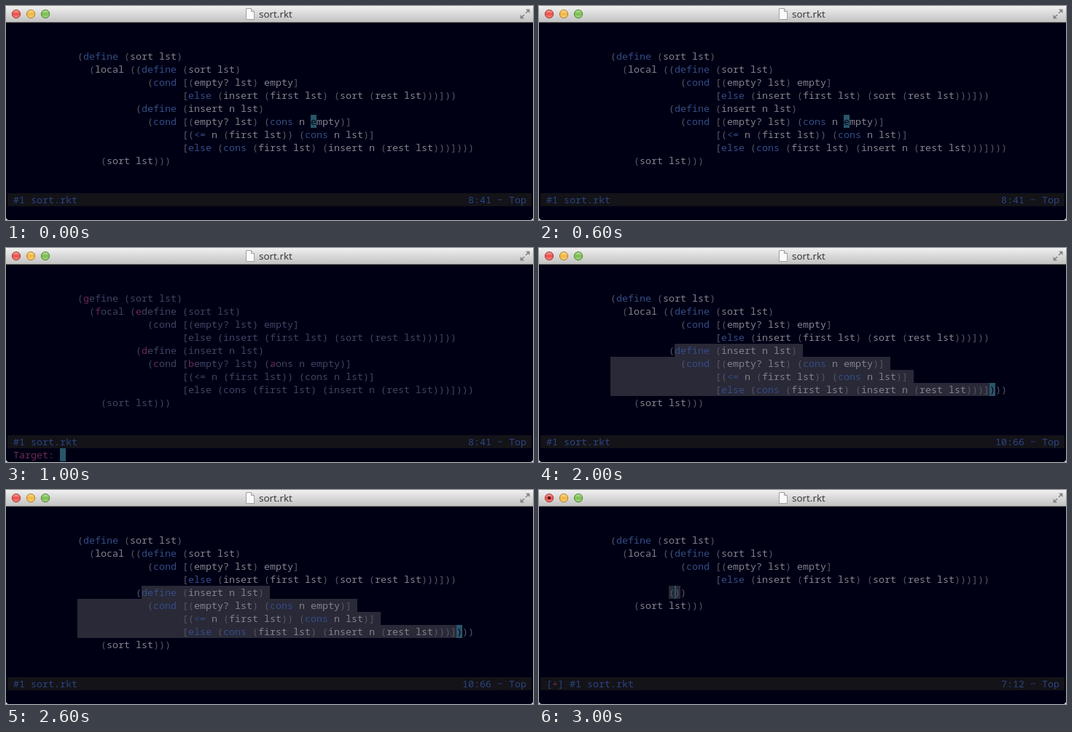
These frames come from a looping animation (723x295 px, 4000 ms). An HTML page:

```html
<!DOCTYPE html>
<html lang="en">
<head>
<meta charset="utf-8">
<title>sort.rkt</title>
<style>
html, body { margin: 0; width: 100%; height: 100%; overflow: hidden; background: #fff; }
svg { display: block; }
text { white-space: pre; }
.code { font: 13.3333px "Noto Sans Mono", "DejaVu Sans Mono", monospace; }
.title { font: 13.5px "Open Sans", "Lato", sans-serif; fill: #303030; }
</style>
</head>
<body>
<svg width="723" height="295" viewBox="0 0 723 295">
  <defs>
    <linearGradient id="bar" x2="0" y2="1">
      <stop offset="0" stop-color="#f0f0f0"/>
      <stop offset="1" stop-color="#c2c2c2"/>
    </linearGradient>
    <linearGradient id="gloss" x2="0" y2="1">
      <stop offset="0" stop-color="#fff" stop-opacity=".5"/>
      <stop offset=".5" stop-color="#fff" stop-opacity="0"/>
      <stop offset="1" stop-color="#fff" stop-opacity=".35"/>
    </linearGradient>
  </defs>
  <path d="M0 22H723V291Q723 295 719 295H4Q0 295 0 291Z" fill="#000015"/>
  <path d="M0 22V5Q0 0 5 0H718Q723 0 723 5V22Z" fill="url(#bar)"/>
  <path d="M0 22.5H723" stroke="#6a6a6a"/>
  <g stroke-width="1">
    <circle cx="14" cy="11" r="5.7" fill="#ea4d46" stroke="#a9403b"/>
    <circle cx="34" cy="11" r="5.7" fill="#f2b53d" stroke="#b1832f"/>
    <circle cx="54" cy="11" r="5.7" fill="#78bd4b" stroke="#57893a"/>
  </g>
  <g fill="url(#gloss)">
    <circle cx="14" cy="11" r="5"/><circle cx="34" cy="11" r="5"/><circle cx="54" cy="11" r="5"/>
  </g>
  <path d="M329.5 3.5H336.5L340.5 7.5V18.5H329.5Z" fill="#fafafa" stroke="#a0a0a0"/>
  <path d="M336.5 3.5V7.5H340.5" fill="#ddd" stroke="#a0a0a0"/>
  <text class="title" x="347" y="16">sort.rkt</text>
  <g fill="#858585" stroke="#858585" stroke-width="1.6">
    <path d="M713 10L717 6M711 12L707 16"/>
    <path d="M713 4.5H718.5V10ZM705.5 12V17.5H711Z" stroke="none"/>
  </g>
  <rect x="2" y="258" width="719" height="18" fill="#131318"/>
  <g id="screen" class="code"></g>
</svg>
<script>
const NS = "http://www.w3.org/2000/svg";
const CELL = 8, ROW = 18, LEFT = 98;
const ink = {
  bg: "#000015", word: "#82828f", paren: "#555565", key: "#344d87", dim: "#3e4462",
  status: "#2c4483", mark: "#6d2a52", cursor: "#28566a", select: "#292937"
};

const head = [
  [3, 0, "(define (sort lst)"],
  [4, 2, "(local ((define (sort lst)"],
  [5, 12, "(cond [(empty? lst) empty]"],
  [6, 18, "[else (insert (first lst) (sort (rest lst)))]))"]
];
const full = [
  ...head,
  [7, 10, "(define (insert n lst)"],
  [8, 12, "(cond [(empty? lst) (cons n empty)]"],
  [9, 18, "[(<= n (first lst)) (cons n lst)]"],
  [10, 18, "[else (cons (first lst) (insert n (rest lst)))])))"],
  [11, 4, "(sort lst)))"]
];
const cut = [...head, [7, 10, "())"], [8, 4, "(sort lst)))"]];
const targets = [
  [8, 33, "a"], [8, 19, "b"], [8, 13, "c"], [7, 11, "d"],
  [4, 10, "e"], [4, 3, "f"], [3, 1, "g"]
];

function add(parent, tag, attrs, content = "") {
  const el = document.createElementNS(NS, tag);
  for (const k in attrs) el.setAttribute(k, attrs[k]);
  el.textContent = content;
  return parent.appendChild(el);
}

const xOf = col => LEFT + col * CELL;
const yOf = row => 6 + row * ROW;

function write(g, row, col, str, fill) {
  add(g, "text", { x: xOf(col), y: yOf(row) + 14, fill }, str);
}

function block(g, row, col, cells, fill, width = cells * CELL) {
  add(g, "rect", { x: xOf(col), y: yOf(row), width, height: ROW, fill });
}

function tint(token) {
  if (/[()[\]]/.test(token)) return ink.paren;
  return /^(define|cond|else|cons|<=)$/.test(token) ? ink.key : ink.word;
}

function code(g, lines) {
  for (const [row, col, str] of lines)
    for (const m of str.matchAll(/[()[\]]+|[^\s()[\]]+/g))
      write(g, row, col + m.index, m[0], tint(m[0]));
}

function status(g, place, col = -11) {
  write(g, 14, col, "#1 sort.rkt", ink.status);
  const str = place + " ~ Top";
  write(g, 14, 77 - str.length, str, ink.status);
}

const scenes = [
  g => {
    code(g, full);
    block(g, 8, 40, 1, ink.cursor);
    write(g, 8, 40, "e", ink.bg);
    status(g, "8:41");
  },
  g => {
    for (const [row, col, str] of full) {
      const chars = [...str];
      for (const [r, c, letter] of targets) {
        if (r !== row) continue;
        chars[c - col] = " ";
        write(g, r, c, letter, ink.mark);
      }
      write(g, row, col, chars.join(""), ink.dim);
    }
    status(g, "8:41");
    write(g, 15, -11, "Target:", ink.mark);
    block(g, 15, -3, 1, ink.cursor);
  },
  g => {
    block(g, 7, 11, 22, ink.select);
    block(g, 8, 0, 48, ink.select);
    block(g, 9, 0, 52, ink.select);
    block(g, 10, 0, 65, ink.select);
    block(g, 10, 65, 1, ink.cursor);
    code(g, full);
    write(g, 10, 65, ")", ink.bg);
    status(g, "10:66");
  },
  g => {
    block(g, 7, 10, 2, ink.select);
    code(g, cut);
    block(g, 7, 11, 1, ink.cursor, 2);
    write(g, 14, -11, "[ ]", ink.status);
    write(g, 14, -10, "+", ink.mark);
    status(g, "7:12", -7);
    add(g, "circle", { cx: 14, cy: 11, r: 2.3, fill: "#5e1512" });
  }
];

const screen = document.getElementById("screen");
const groups = scenes.map(draw => {
  const g = add(screen, "g", {});
  draw(g);
  return g;
});

const start = performance.now();
function tick() {
  const now = Math.floor((performance.now() - start) / 1000) % groups.length;
  groups.forEach((g, i) => g.setAttribute("display", i === now ? "inline" : "none"));
  requestAnimationFrame(tick);
}
tick();
</script>
</body>
</html>
```
